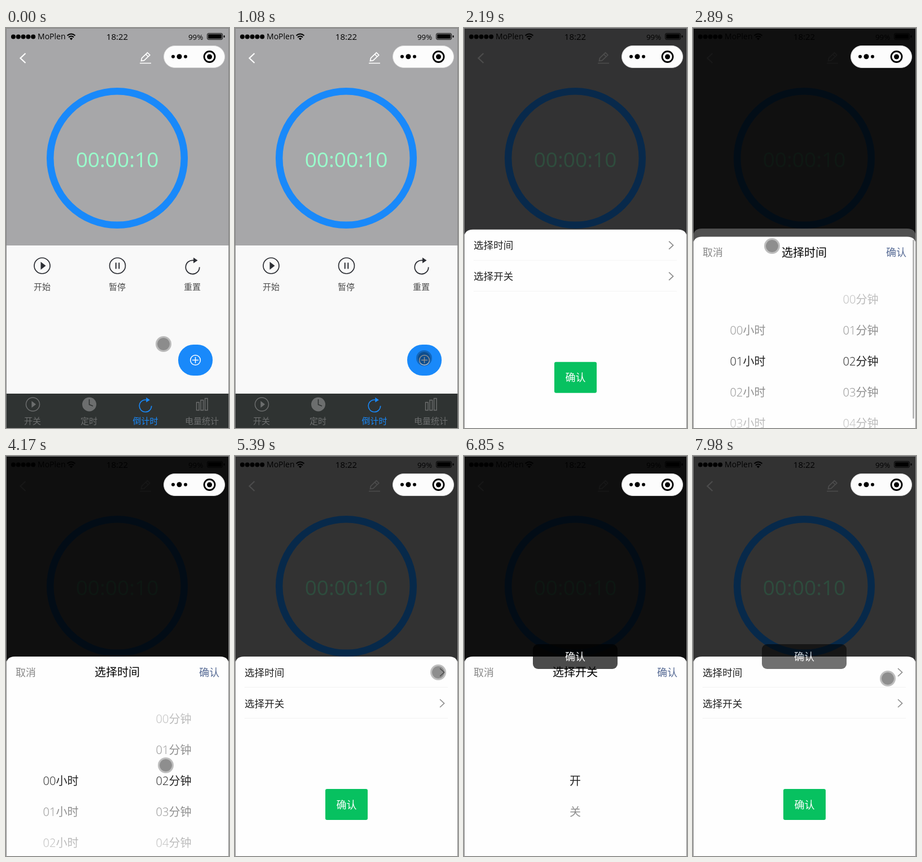
These frames come from a looping animation (395 px wide and 710 px high, 8000 ms). An HTML page:

```html
<!DOCTYPE html>
<html lang="zh">
<head>
<meta charset="utf-8">
<style>
  html, body { margin: 0; height: 100%; overflow: hidden; background: #fff; }
  svg { display: block; }
  text { font-family: "Open Sans", "Noto Sans CJK SC", "Noto Sans CJK", sans-serif; font-weight: 350; }
  .latin { font-weight: 400; }
  .line { fill: none; }
</style>
</head>
<body>
<svg id="stage" width="395" height="710" viewBox="0 0 395 710"></svg>
<script>
const BLUE = '#1989fa', DARK = '#2b2d33', DIM = '#6c6e6e';
const stage = document.getElementById('stage');

// Text placed by its vertical centre
const text = (x, y, str, size, fill, anchor = 'middle', cls = '') =>
  `<text class="${cls}" x="${x}" y="${y + size * .37}" font-size="${size}" fill="${fill}" text-anchor="${anchor}">${str}</text>`;
const line = (d, stroke, width, extra = '') =>
  `<path class="line" d="${d}" stroke="${stroke}" stroke-width="${width}" ${extra}/>`;
const rect = (x, y, w, h, fill, r = 0, extra = '') =>
  `<rect x="${x}" y="${y}" width="${w}" height="${h}" rx="${r}" fill="${fill}" ${extra}/>`;
const dot = (x, y, r, fill) => `<circle cx="${x}" cy="${y}" r="${r}" fill="${fill}"/>`;
const ring = (x, y, r, stroke, width) =>
  `<circle class="line" cx="${x}" cy="${y}" r="${r}" stroke="${stroke}" stroke-width="${width}"/>`;
const at = (x, y, k, body) => `<g transform="translate(${x} ${y}) scale(${k})">${body}</g>`;

const play = color => ring(0, 0, 14, color, 1.7) + `<path d="M-2.5-7L6.5 0L-2.5 7Z" fill="${color}"/>`;
const pause = color => ring(0, 0, 14, color, 1.7) + line('M-2.8-5.5V5.5M2.8-5.5V5.5', color, 2);
const reset = color => line('M12.2 2A12.2 12.2 0 1 1 2-10', color, 1.8) +
  `<path d="M1.5-15L9-10L1.5-5Z" fill="${color}"/>`;

function statusBar() {
  let s = '';
  for (let i = 0; i < 5; i++) s += dot(13 + i * 8.8, 15.5, 4, '#000');
  return s + text(56, 15, 'MoPlen', 14, '#000', 'start', 'latin') +
    line('M108.5 13.5Q115.5 7.5 122.5 13.5M111 16.5Q115.5 12.5 120 16.5', '#000', 2) +
    '<path d="M112.8 18.5Q115.5 16.5 118.2 18.5L115.5 21.5Z"/>' +
    text(197, 15.5, '18:22', 15, '#000', 'middle', 'latin') +
    text(336, 16, '99%', 13.3, '#000', 'middle', 'latin') +
    `<rect class="line" x="356.5" y="9.5" width="27" height="11" rx="2.5" stroke="#000"/>` +
    rect(358, 11, 24, 8, '#000', 1) + rect(385.5, 13, 2, 4, '#000', 1);
}

function page() {
  return rect(0, 0, 395, 386, '#a7a7a9') + rect(0, 386, 395, 263, '#f9f9f9') +
    rect(0, 649, 395, 61, '#2f3332') + statusBar() +
    line('M34.5 45L25.5 53.5L34.5 62', '#fff', 2.2) +
    line('M237 62.5H257M239.5 58.5L240.5 53.5L250.5 43.8L254.8 48L244.6 57.6ZM247.5 46.5L252 51', '#fff', 1.7) +
    ring(197, 231, 118.8, BLUE, 12.5) +
    text(197, 233, '00:00:10', 37, '#99ffcc', 'middle', 'latin') +
    at(64, 422, 1, play(DARK)) + at(197.5, 422, 1, pause(DARK)) + at(330.5, 422.5, 1, reset(DARK)) +
    ['开始', '暂停', '重置'].map((s, i) => text(64 + i * 133, 459, s, 15, '#4c4c4c')).join('') +
    rect(305, 562, 61, 55, BLUE, 27) + ring(335.5, 589.5, 8.8, '#fff', 1.5) +
    line('M335.5 584V595M330 589.5H341', '#fff', 1.5) +
    at(47.5, 668, .86, play(DIM)) + dot(147.5, 668, 12.5, DIM) +
    line('M147.5 659V668.5L154 671', '#2f3332', 1.6) +
    at(247, 669, .88, reset(BLUE)) +
    line('M337.5 664.5h4.5v14h-4.5zM345 660.5h4.5v18h-4.5zM352.5 657.5h4.5v21h-4.5z', DIM, 1.4) +
    ['开关', '定时', '倒计时', '电量统计'].map((s, i) =>
      text(47 + i * 100, 697.5, s, 15, i === 2 ? BLUE : DIM)).join('');
}

const sheetBack = '<path d="M0 710V372Q0 356 16 356H379Q395 356 395 372V710Z" fill="#fefefe"/>';

function menuSheet() {
  return sheetBack + ['选择时间', '选择开关'].map((s, i) => {
    const y = 384 + i * 55;
    return text(17, y, s, 17.6, '#222', 'start') + rect(17, y + 26, 360, 1, '#f2f2f2') +
      line(`M363 ${y - 7}L370.5 ${y}L363 ${y + 7}`, '#8c8c8c', 1.7);
  }).join('') + rect(160, 591, 75, 55, '#07c160', 3) + text(197.5, 619, '确认', 18, '#fff');
}

const column = (id, x, items) =>
  `<g id="${id}">${items.map((s, i) => text(x, 577 + i * 55, s, 20, '#222')).join('')}</g>`;
const numbered = unit => [0, 1, 2, 3, 4, 5].map(n => '0' + n + unit);

function pickerSheet() {
  return sheetBack +
    `<g id="timeCols">${column('hours', 97, numbered('小时'))}${column('minutes', 297, numbered('分钟'))}</g>` +
    column('power', 197, ['开', '关']) +
    rect(1, 412, 393, 137, 'url(#fadeTop)') + rect(1, 605, 393, 137, 'url(#fadeBottom)') +
    text(17, 384, '取消', 18, '#888', 'start') +
    '<text id="title" x="197" y="391.4" font-size="20" text-anchor="middle"></text>' +
    text(378, 384, '确认', 18, '#576b95', 'end') +
    rect(389, 361, 3, 318, '#b8b8b8', 1.5, 'id="bar"');
}

const fade = (id, from, to) => `<linearGradient id="${id}" x2="0" y2="1">
  <stop stop-color="#fefefe" stop-opacity="${from}"/>
  <stop offset="1" stop-color="#fefefe" stop-opacity="${to}"/></linearGradient>`;

stage.innerHTML = fade('fadeTop', .9, .4) + fade('fadeBottom', .4, .9) + page() +
  rect(0, 0, 395, 710, '#000', 0, 'id="shade1"') + `<g id="menu">${menuSheet()}</g>` +
  rect(0, 0, 395, 710, '#000', 0, 'id="shade2"') + `<g id="picker">${pickerSheet()}</g>` +
  `<g id="toast">${rect(122, 334, 150, 44, '#000', 9, 'opacity=".7"')}${text(197, 356, '确认', 18, '#fff')}</g>` +
  rect(279.5, 31.5, 108, 39, '#fcfcfc', 19.5, 'stroke="#d4d4d4"') +
  dot(296, 50.8, 3, '#000') + dot(307, 50.8, 4.5, '#000') + dot(318, 50.8, 3, '#000') +
  ring(360.5, 51, 9.5, '#000', 2.8) + dot(360.5, 51, 4.5, '#000') +
  `<g id="cursor">${ring(0, 0, 12.5, 'rgba(0,0,0,.25)', 3)}${dot(0, 0, 11, 'rgba(0,0,0,.44)')}</g>` +
  line('M.5 710V.5H394.5V710', '#858585', 1);

const el = id => document.getElementById(id);
const set = (id, name, value) => el(id).setAttribute(name, value);
const show = (id, on) => set(id, 'display', on ? 'inline' : 'none');
const shift = (id, y) => set(id, 'transform', `translate(0 ${y})`);

const ramp = (t, start, span) => Math.min(1, Math.max(0, (t - start) / span));
// CSS "ease" curve over a time span
function ease(t, start, span = 300) {
  const x = ramp(t, start, span);
  if (x === 0 || x === 1) return x;
  let lo = 0, hi = 1, s;
  for (let i = 0; i < 24; i++) {
    s = (lo + hi) / 2;
    if (.75 * s * (1 - s) + s ** 3 < x) lo = s; else hi = s;
  }
  return .3 * s * (1 - s) ** 2 + 3 * s * s * (1 - s) + s ** 3;
}

// The screen refreshes in bursts: [start, refreshes], 120 ms apart
const bursts = [[0, 1], [840, 3], [1950, 3], [2340, 1], [2620, 1], [2770, 3], [3160, 2], [3420, 5],
  [4170, 2], [4440, 1], [4720, 2], [5150, 4], [5660, 1], [5930, 1], [6190, 3], [6580, 2],
  [6850, 1], [6990, 3], [7470, 2], [7850, 1], [7980, 1]];
function refreshTime(t) {
  const [start, count] = bursts.findLast(b => b[0] <= t);
  return start + 120 * Math.min(count - 1, Math.floor((t - start) / 120));
}

// Touch pointer: [time, x, y], or [time] when lifted
const touches = [[0, 279, 561], [840], [960, 335, 586], [2070], [2620, 140, 387], [3160, 124, 525], [3420],
  [4170, 283, 549], [4290], [4440, 297, 511], [4720], [5150, 360, 384], [5510], [5930, 167, 439], [6430],
  [6580, 184, 585], [6700, 188, 579], [6850], [6990, 202, 627], [7110], [7590, 357, 396], [7850, 345, 395]];

function slide(sheet, shade, p) {
  show(sheet, p > 0);
  shift(sheet, 354 * (1 - p));
  set(shade, 'opacity', .7 * p ** .65);
}

function draw(t) {
  slide('menu', 'shade1', ease(t, 1918));
  const second = t > 5700;
  slide('picker', 'shade2', second
    ? ease(t, 6100) - ease(t, 7680)
    : ease(t, 2666) - ease(t, 5090));
  show('timeCols', !second);
  show('power', second);
  el('title').textContent = second ? '选择开关' : '选择时间';
  set('bar', 'opacity', second ? 1 - ramp(t, 6480, 200) : 1 - ramp(t, 3080, 320));
  shift('hours', -55 * (1 - ease(t, 3400, 480)));
  shift('minutes', -55 * (2 - ease(t, 4640, 200)));
  shift('power', -55 * ease(t, 7040, 190));
  set('toast', 'opacity', t < 7600 ? ramp(t, 5430, 100) - ramp(t, 7420, 100) : ramp(t, 7900, 100));
  const [, x, y] = touches.findLast(p => p[0] <= t);
  show('cursor', x !== undefined);
  if (x !== undefined) set('cursor', 'transform', `translate(${x} ${y})`);
}

const begin = performance.now();
function frame() {
  draw(refreshTime((performance.now() - begin) % 8000));
  requestAnimationFrame(frame);
}
frame();
</script>
</body>
</html>
```
